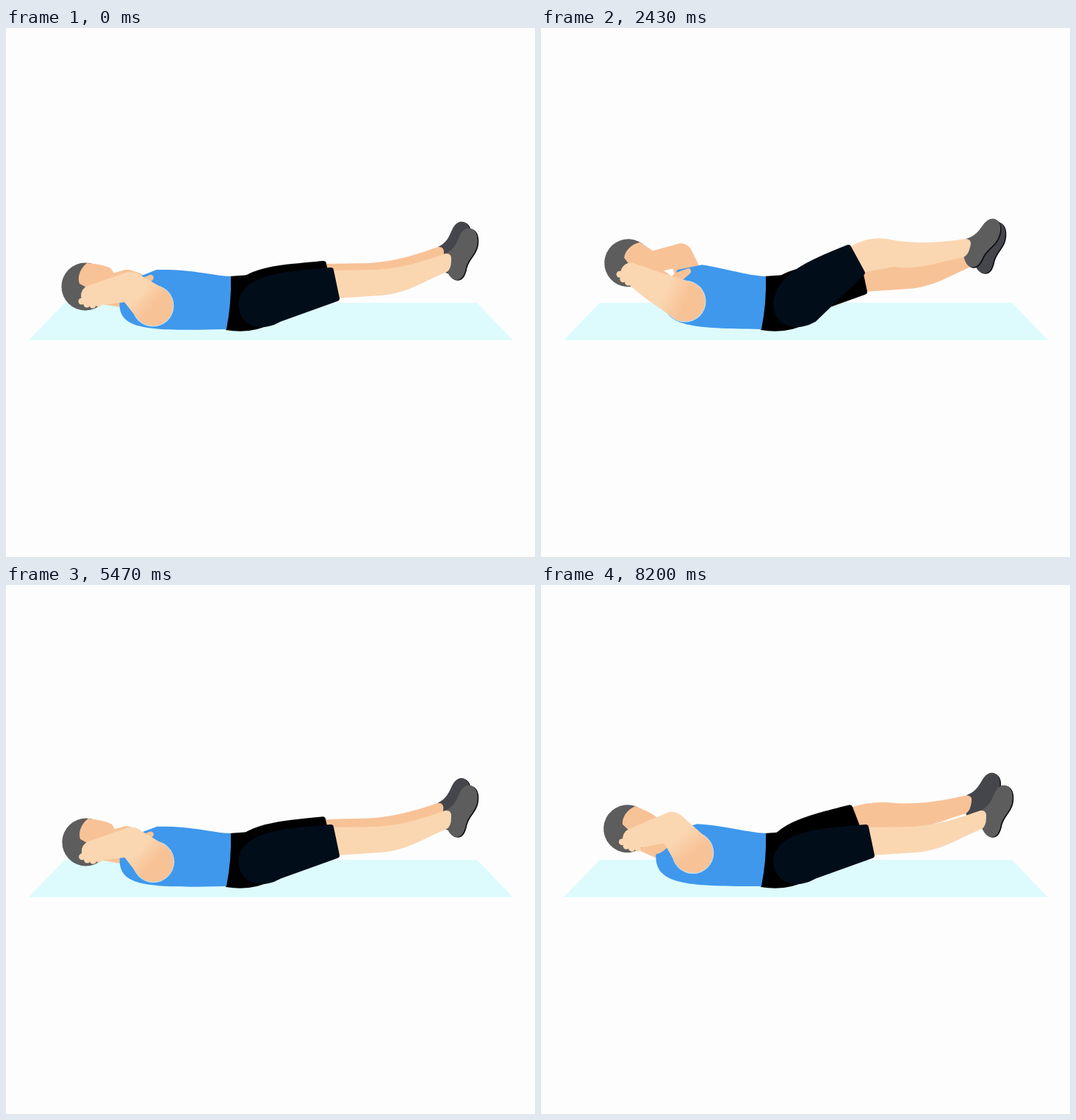
An HTML page with a canvas for the animation above (8.23 s loop, 720x720 px).

```html
<!DOCTYPE html>
<html lang="en">
<head>
<meta charset="utf-8">
<title>Bicycle crunch</title>
<style>
html, body { margin: 0; height: 100%; overflow: hidden; background: #fdfdfd; }
canvas { display: block; width: 100vmin; height: 100vmin; }
</style>
</head>
<body>
<canvas id="stage" width="720" height="720"></canvas>
<script>
const ctx = document.getElementById('stage').getContext('2d');
const LOOP = 8230, CYCLE = 2655, MOVE = 430;
const PEACH = '#fad7b1', TAN = '#f8c297', BLUE = '#3f98ec', GREY = '#5d5d5e';
const HIP = [325, 395], KNEE = [462, 335], ANKLE = [603, 317];
const RAD = Math.PI / 180;

// Progress of one move, between linear and smooth.
function ease(t, start) {
  const u = Math.min(1, Math.max(0, (t - start) / MOVE));
  return (u + u * u * (3 - 2 * u)) / 2;
}

// Quadratic through three poses: at rest, half way and fully raised.
function quad(h, rest, half, full) {
  return rest * (1 - 2 * h) * (1 - h) + half * 4 * h * (1 - h) + full * h * (2 * h - 1);
}
const bend = (h, rest, half, full) => [0, 1].map(i => quad(h, rest[i], half[i], full[i]));

function turn([x, y], [cx, cy], deg) {
  const c = Math.cos(deg * RAD), s = Math.sin(deg * RAD);
  return [cx + (x - cx) * c - (y - cy) * s, cy + (x - cx) * s + (y - cy) * c];
}
const polar = ([x, y], r, deg) => [x + r * Math.cos(deg * RAD), y - r * Math.sin(deg * RAD)];

function fill(path, color) {
  ctx.fillStyle = color;
  ctx.fill(new Path2D(path));
}

function disc([x, y], r, color) {
  ctx.fillStyle = color;
  ctx.beginPath();
  ctx.arc(x, y, r, 0, 2 * Math.PI);
  ctx.fill();
}

// Tapered limb: the outline around two circles.
function limb(a, ra, b, rb, color) {
  const dx = b[0] - a[0], dy = b[1] - a[1];
  const dir = Math.atan2(dy, dx);
  const open = Math.acos(Math.max(-1, Math.min(1, (ra - rb) / Math.hypot(dx, dy))));
  ctx.fillStyle = color;
  ctx.beginPath();
  ctx.arc(a[0], a[1], ra, dir + open, dir - open + 2 * Math.PI);
  ctx.arc(b[0], b[1], rb, dir - open, dir + open);
  ctx.fill();
}

function leg(h, dx, dy, skin, cloth, shoe) {
  const lift = 60 * h;
  const hemTop = turn([442, 330], HIP, -lift);
  const hemLow = turn([450, 368], HIP, -lift);
  const thigh = turn([385, 335], HIP, -lift);
  const cap = polar(HIP, 161 + 28 * h, 24 + 68 * h);
  const knee = turn(KNEE, HIP, -lift);
  const foot = turn([knee[0] + ANKLE[0] - KNEE[0], knee[1] + ANKLE[1] - KNEE[1]], knee, 25.7 * h);
  const tilt = 37 * h ** 0.9;
  const on = (x, y) => turn([foot[0] + x - ANKLE[0], foot[1] + y - ANKLE[1]], foot, tilt);

  ctx.save();
  ctx.translate(dx, dy);

  ctx.save();
  ctx.translate(...foot);
  ctx.rotate(tilt * RAD);
  ctx.translate(-ANKLE[0], -ANKLE[1]);
  const sole = 'M598 307C610 301 613 293 617 284C621 275 627 271 633 273C642 276 643 288 641 297' +
    'C638 309 630 313 626 326C624 337 620 343 613 343C605 342 603 336 600 331Z';
  ctx.translate(1.5, 0.8);
  fill(sole, '#0b0b10');
  ctx.translate(-1.5, -0.8);
  fill(sole, shoe);
  ctx.restore();

  fill(`M${hemTop}Q${cap} ${on(505, 329)}C${on(545, 326)} ${on(575, 315)} ${on(598, 307)}` +
    `Q${on(607, 306)} ${on(606, 316)}Q${on(606, 328)} ${on(600, 332)}` +
    `C${on(570, 344)} ${on(545, 362)} ${on(510, 364)}L${hemLow}Z`, skin);

  const shorts = new Path2D(`M320 375C323 338 ${thigh} ${hemTop}L${hemLow}` +
    'L372 396C352 408 322 407 320 375Z');
  ctx.fillStyle = ctx.strokeStyle = cloth;
  ctx.lineWidth = 8;
  ctx.lineJoin = 'round';
  ctx.fill(shorts);
  ctx.stroke(shorts);
  ctx.restore();
}

function drawHead(at, angle) {
  ctx.save();
  ctx.translate(...at);
  ctx.rotate(angle * RAD);
  disc([0, 0], 32.5, GREY);
  fill('M2 -32C-8 -24 -11 -12 -8 -4L22 12L40 4Q42 -20 33 -26Q20 -31 2 -32Z', TAN);
  ctx.restore();
}

function drawTorso(h, nape, back) {
  const chest = bend(h, [205, 329], [230, 317], [255, 305]);
  const strap = bend(h, [182, 338], [190, 323], [208, 312]);
  const waist = bend(h, [185, 413], [222, 406], [250, 402]);
  const scoop = [strap[0] - 9, (strap[1] + nape[1]) / 2 + 14];
  fill('M304 338L299 411Q335 417 362 402L380 350L345 335Z', '#000');
  fill(`M306 338C280 337 255 328 ${chest}L${strap}Q${scoop} ${nape}` +
    `C${back} ${waist} 300 410Q307 375 306 338Z`, BLUE);
  limb([strap[0], strap[1] + 11], 7, [strap[0] + 15, strap[1] + 2], 4, TAN);
}

function drawNearArm(shoulder, elbow, hand, angle) {
  disc(shoulder, 28.5, '#b9e3f6');
  const shade = ctx.createLinearGradient(...elbow, ...shoulder);
  shade.addColorStop(0.35, PEACH);
  shade.addColorStop(1, TAN);
  limb(shoulder, 27.5, elbow, 20, shade);
  limb(elbow, 20, hand, 14, PEACH);
  for (const [x, y] of [[-13, 8], [-6, 12], [2, 13], [10, 11]]) {
    disc(turn([hand[0] + x, hand[1] + y], hand, angle), 4.5, PEACH);
  }
}

function draw(time) {
  const t = time % LOOP % CYCLE;
  const far = ease(t, 150) - ease(t, 812);
  const near = ease(t, 1480) - ease(t, 2138);
  const h = far + near;
  // The upper body differs by the side being raised.
  const side = (rest, farHalf, farFull, nearHalf, nearFull) =>
    near > 0 ? bend(h, rest, nearHalf, nearFull) : bend(h, rest, farHalf, farFull);

  const head = side([108, 352], [138, 298], [163, 280], [129, 301], [158, 280]);
  const angle = quad(h, 0, 39, 50);
  const neck = bend(h, [163, 364], [172, 343], [184, 328]);
  const nape = side([155, 368], [159, 360], [160, 345], [174, 366], [176, 350]);
  const back = side([150, 410], [162, 402], [172, 393], [174, 404], [182, 394]);
  const shoulder = side([200, 378], [220, 344], [233, 339], [196, 367], [206, 355]);
  const elbow = side([170, 352], [205, 293], [265, 281], [144, 348], [138, 335]);
  const hand = side([116, 364], [145, 313], [172, 293], [130, 317], [156, 304]);
  const farShoulder = side([175, 350], [165, 345], [172, 335], [215, 325], [228, 312]);
  const farElbow = side([165, 345], [142, 328], [156, 322], [210, 290], [255, 275]);

  ctx.fillStyle = '#fdfdfd';
  ctx.fillRect(0, 0, 720, 720);
  fill('M80 374H641L690 425H31Z', '#ddfbfc');

  leg(far, -10, -9, TAN, '#000', '#45464b');
  limb(farShoulder, 18, farElbow, 16, TAN);
  limb(farElbow, 16, [head[0] + 18, head[1] + 2], 14, TAN);
  limb(head, 20, neck, 17, TAN);
  drawHead(head, angle);
  drawTorso(h, nape, back);
  leg(near, 0, 0, PEACH, '#020d1a', GREY);
  drawNearArm(shoulder, elbow, hand, angle);
}

function frame() {
  draw(performance.now());
  requestAnimationFrame(frame);
}
frame();
</script>
</body>
</html>
```
